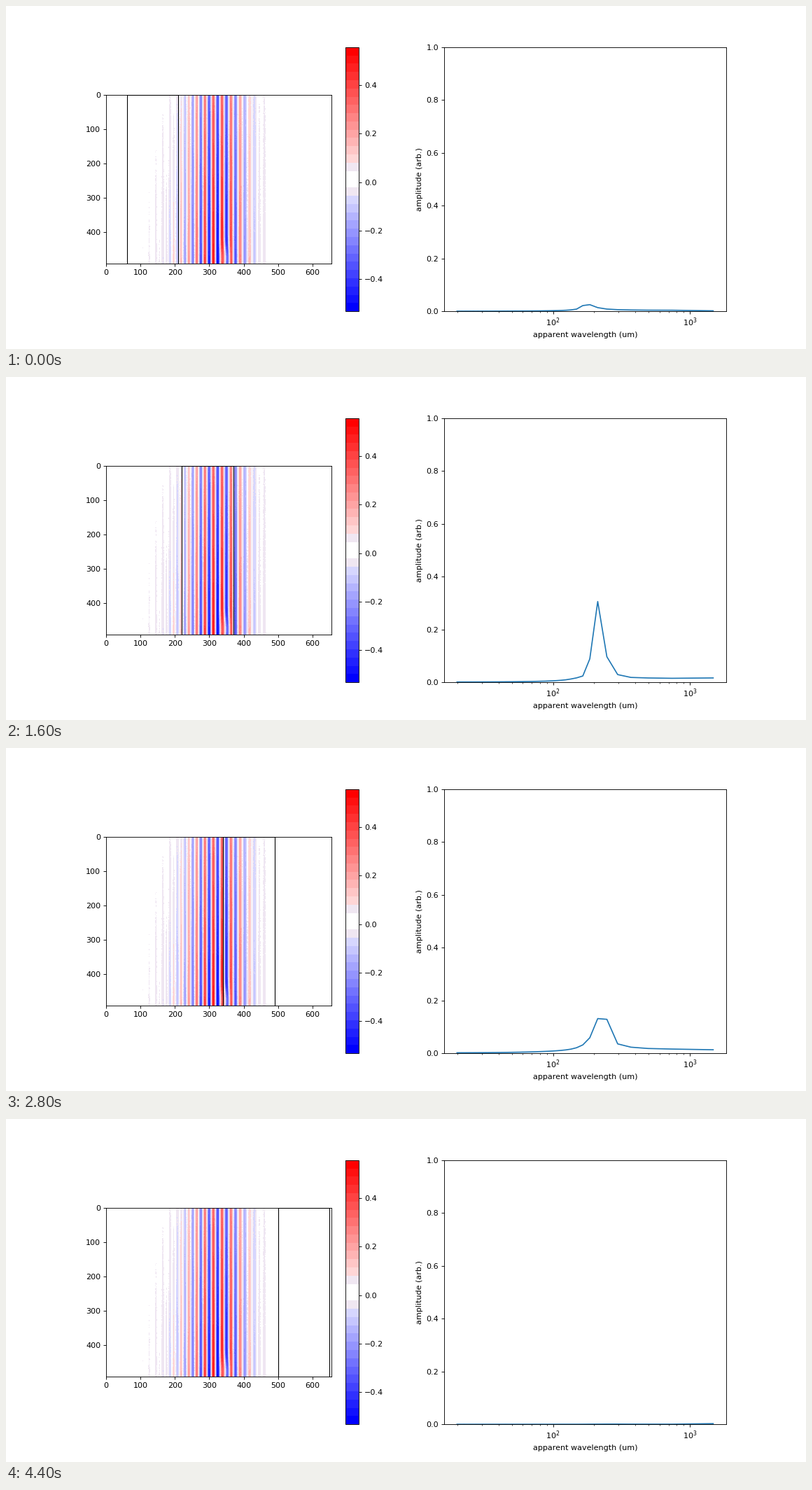
A matplotlib script for the animation above (4600 ms loop, 1143 px wide and 490 px high).

```python
import numpy as np
import matplotlib.pyplot as plt
from matplotlib.animation import FuncAnimation
from matplotlib.colors import ListedColormap
from matplotlib.patches import Rectangle

DPI, WIDTH, HEIGHT = 80, 1143, 490
FRAMES, INTERVAL = 23, 200
COLS, ROWS = 656, 492
WINDOW, START, STEP = 150, 60, 20
PIXEL_UM = 9.9
VMIN, VMAX = -0.532, 0.5555


def fringe_image():
    """Chirped vertical fringes under a smooth envelope, with sensor noise."""
    x = np.arange(COLS)[None, :]
    y = np.arange(ROWS)[:, None] / ROWS

    # slow rise on the left, faster gaussian fall on the right
    d = x - 322
    env = 0.53 * np.where(d < 0, 1 / np.cosh(d / 55), np.exp(-(d / 85) ** 2))

    # weaker towards the top, most of all on the left flank
    flank = 1 / (1 + np.exp((x - 215) / 14))
    gain = (0.66 + 0.34 * y) * (1 - 0.6 * flank * (1 - y ** 0.7))

    # local blemish near the lower edge
    spot = np.exp(-((x - 346) / 15) ** 2 - ((y - 0.97) / 0.075) ** 2)

    # the period grows linearly with x, with a crest at x = 336
    slope, period = 0.03, 25.6
    phase = 2 * np.pi / slope * np.log(1 + slope * (x - 336) / period)

    noise = np.random.default_rng(4).normal(0, 0.006, (ROWS, COLS))
    wave = np.cos(phase - 0.7 * spot)
    return env * gain * (1 - 0.35 * spot) * wave + noise + 0.001


def stepped_bwr(n=32):
    """Coarse blue-white-red map with a flattened middle."""
    colors = plt.get_cmap("bwr")(np.linspace(0, 1, n))[:, :3]
    mid = n // 2
    colors[[mid - 2, mid + 1]] = 0.94, 0.905, 0.95
    colors[[mid - 1, mid]] = 1
    return ListedColormap(colors)


image = fringe_image()
profile = image.mean(axis=0)
wavelength = WINDOW * PIXEL_UM / np.arange(1, WINDOW // 2 + 1)


def spectrum(x0):
    amp = np.abs(np.fft.rfft(profile[x0:x0 + WINDOW])) * 2 / WINDOW
    return amp[:len(wavelength)]


# the tiny excess guards against rounding down by a pixel
fig, (ax_img, ax_spec) = plt.subplots(
    1, 2, figsize=(WIDTH / DPI + 1e-6, HEIGHT / DPI + 1e-6), dpi=DPI)

im = ax_img.imshow(image, cmap=stepped_bwr(), vmin=VMIN, vmax=VMAX)
fig.colorbar(im, ax=ax_img)
box = Rectangle((START, 0), WINDOW, ROWS - 1, fill=False, ec="black", lw=1)
ax_img.add_patch(box)

line, = ax_spec.semilogx(wavelength, spectrum(START))
ax_spec.set_ylim(0, 1)
ax_spec.set_xlabel("apparent wavelength (um)")
ax_spec.set_ylabel("amplitude (arb.)")


def update(i):
    x0 = START + STEP * i
    box.set_x(x0)
    line.set_ydata(spectrum(x0))
    return box, line


anim = FuncAnimation(fig, update, frames=FRAMES, interval=INTERVAL,
                     repeat=True, repeat_delay=0, blit=False)
plt.show()
```
